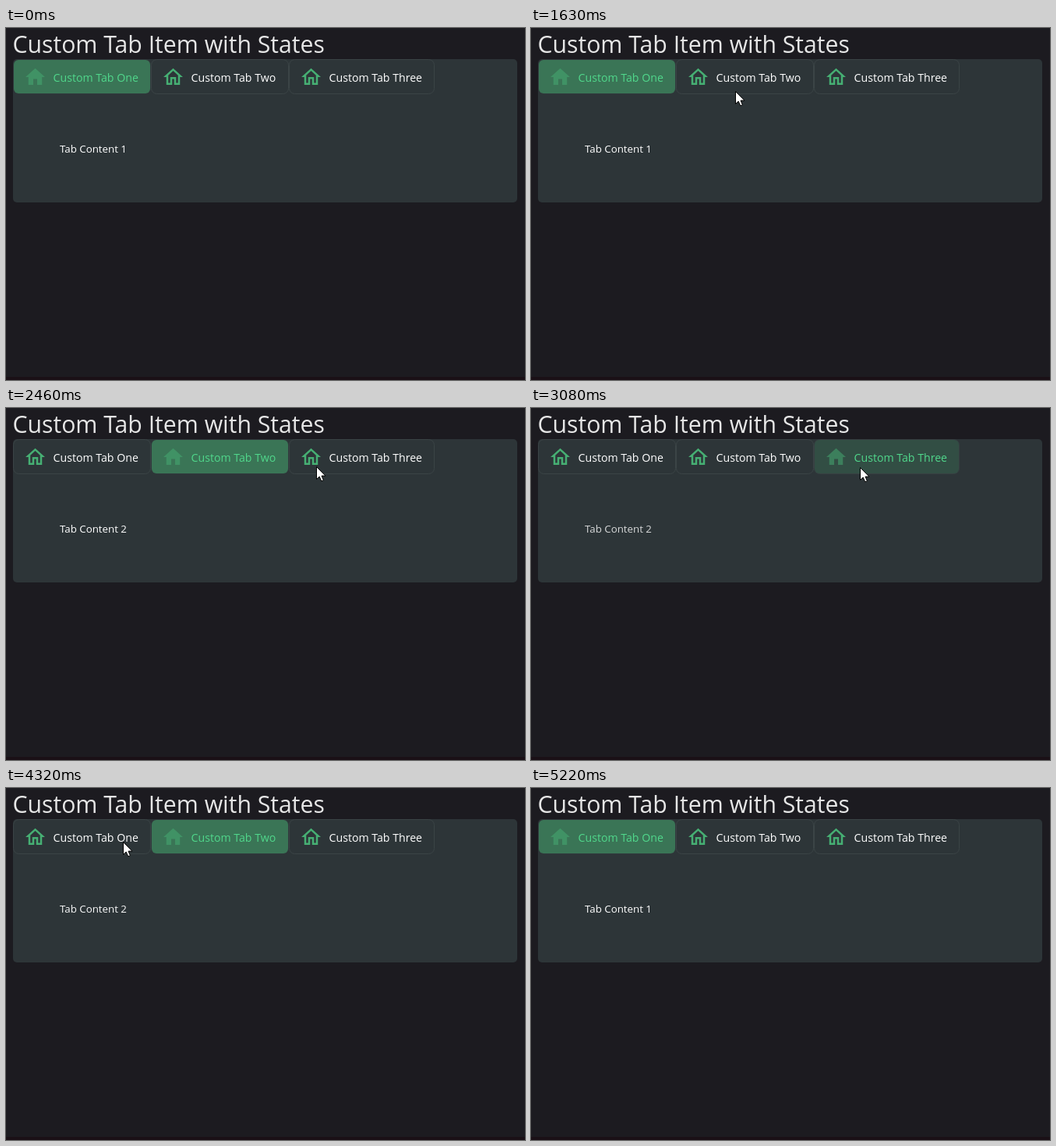
Write an HTML page with a canvas that moves like this. It is 666 by 452 pixels and loops after 5.62 s.

```html
<!DOCTYPE html>
<html lang="en">
<head>
<meta charset="utf-8">
<title>Custom Tab Item with States</title>
<style>
html, body { margin: 0; height: 100%; overflow: hidden; background: #1c1b20; }
canvas { display: block; }
</style>
</head>
<body>
<canvas id="stage" width="666" height="452"></canvas>
<script>
const ctx = document.getElementById('stage').getContext('2d');
const LOOP = 5620, STEP = 69, PRESS = 130, FADE = 250;
const FONT = '"Open Sans", "Noto Sans", sans-serif';

const tabs = [
  { x: 9, w: 177, label: 'Custom Tab One' },
  { x: 186, w: 177, label: 'Custom Tab Two' },
  { x: 363, w: 187, label: 'Custom Tab Three' }
];

// The pointer enters, clicks three tabs and the first one again, then leaves
const enter = { time: 724, to: [633, 445] };
const moves = [
  { leave: 931, arrive: 1690, via: [140, 281], to: [270, 66], press: 1690, pick: 1926, tab: 1 },
  { leave: 1966, arrive: 2656, via: [360, 74], to: [422, 76], press: 2932, pick: 2960, tab: 2 },
  { leave: 3484, arrive: 3760, via: [350, 70], to: [278, 65], press: 3760, pick: 3858, tab: 1 },
  { leave: 4105, arrive: 4312, via: [214, 67], to: [150, 69], press: 4340, pick: 4440, tab: 0 },
  { leave: 4588, arrive: 5208, via: [300, 180], to: [643, 452] }
];
const picks = [{ pick: -1000, tab: 0 }, ...moves.filter(m => m.pick)];

const homeOutline = new Path2D('M12 5.69L17 10.19V18H15V12H9V18H7V10.19L12 5.69M12 3L2 12H5V20H11V14H13V20H19V12H22L12 3');
const homeSolid = new Path2D('M10 20V14H14V20H19V12H22L12 3L2 12H5V20Z');
const arrow = new Path2D('M0 0V16L3.7 12.6L6.2 18.3L8.9 17.2L6.5 11.6H11.4Z');

const clamp = v => Math.max(0, Math.min(1, v));
const ease = v => (1 - Math.cos(Math.PI * clamp(v))) / 2;
const slowDown = v => 1 - (1 - clamp(v)) ** 1.4;
const curve = (a, b, c, u) => (1 - u) ** 2 * a + 2 * u * (1 - u) * b + u * u * c;

function text(str, x, y, size, color, alpha = 1) {
  ctx.globalAlpha = alpha;
  ctx.font = `${size}px ${FONT}`;
  ctx.fillStyle = color;
  ctx.fillText(str, x, y);
  ctx.globalAlpha = 1;
}

function box(x, y, w, h, r) {
  ctx.beginPath();
  ctx.roundRect(x, y, w, h, r);
}

function drawTab({ x, w, label }, selected, fill) {
  box(x + 0.5, 40.5, w - 1, 44, 7);
  ctx.lineWidth = 1;
  ctx.strokeStyle = '#3b4446';
  ctx.globalAlpha = 1 - fill * 0.7;
  ctx.stroke();
  box(x + 1, 41, w - 2, 43, 6);
  ctx.fillStyle = '#3a7556';
  ctx.globalAlpha = fill;
  ctx.fill();

  ctx.save();
  ctx.translate(x + 13.5, 48);
  ctx.scale(1.25, 1.25);
  ctx.globalAlpha = selected ? 0.5 : 1;
  ctx.fillStyle = '#46af73';
  ctx.fill(selected ? homeSolid : homeOutline);
  ctx.restore();
  text(label, x + 51.6, 69, 14.15, selected ? '#50d78b' : '#fff');
}

function drawPointer(t) {
  if (t < enter.time || t >= moves.at(-1).arrive) return;
  const n = moves.filter(m => m.leave <= t).length;
  const from = (moves[n - 2] || enter).to;
  const move = moves[n - 1];
  let [x, y] = enter.to;
  if (move) {
    const u = slowDown((t - move.leave) / (move.arrive - move.leave));
    [x, y] = from.map((a, i) => curve(a, move.via[i], move.to[i], u));
  }

  if (move && t >= move.press && t < move.press + PRESS) {
    ctx.beginPath();
    ctx.arc(x, y, 11.8, 0, 2 * Math.PI);
    ctx.fillStyle = 'rgba(250,245,0,0.56)';
    ctx.fill();
  }
  ctx.save();
  ctx.translate(Math.round(x) + 0.5, Math.round(y) + 0.5);
  ctx.lineWidth = 1;
  ctx.strokeStyle = '#000';
  ctx.fillStyle = '#fff';
  ctx.fill(arrow);
  ctx.stroke(arrow);
  ctx.restore();
}

function draw(t) {
  ctx.fillStyle = '#1c1b20';
  ctx.fillRect(0, 0, 666, 452);
  ctx.fillStyle = '#1a1016';
  ctx.fillRect(0, 448, 666, 4);
  text('Custom Tab Item with States', 8.5, 32, 30.2, '#e6e6e6');

  box(9, 40, 647, 184, 5);
  ctx.fillStyle = '#2d3538';
  ctx.fill();

  const n = picks.filter(p => p.pick <= t).length - 1;
  const now = picks[n].tab, before = picks[Math.max(0, n - 1)].tab;
  const age = t - picks[n].pick;
  tabs.forEach((tab, i) => {
    const fill = i === now ? ease(age / FADE) : i === before ? 1 - clamp(age / 100) : 0;
    drawTab(tab, i === now, fill);
  });

  // The old page fades out before the new one fades in
  const page = age < FADE ? before : now;
  const alpha = Math.abs(1 - 2 * ease(age / FADE / 2)) ** 0.8;
  text('Tab Content ' + (page + 1), 69, 160, 13.3, '#fff', alpha);

  drawPointer(t);
}

function frame() {
  const t = performance.now() % LOOP;
  draw(1000 + Math.floor((t - 1000) / STEP) * STEP);
  requestAnimationFrame(frame);
}
frame();
</script>
</body>
</html>
```
